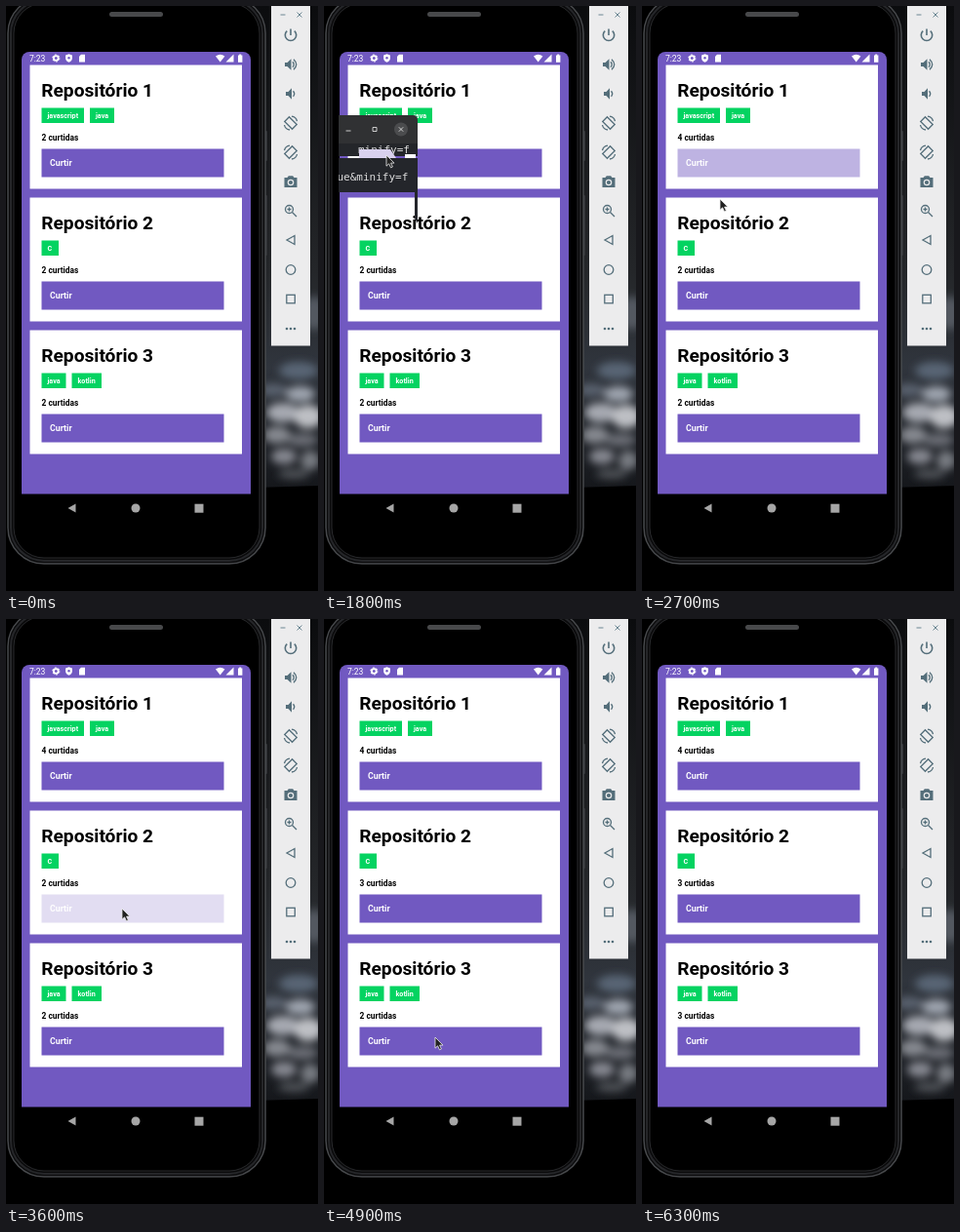
An HTML page for the animation above (6400 ms loop, 320 by 600 pixels).

```html
<!DOCTYPE html>
<html lang="pt">
<head>
<meta charset="utf-8">
<style>
  html, body { margin: 0; width: 100%; height: 100%; overflow: hidden; background: #000; }
  svg { display: block; font-family: Roboto, sans-serif; }
  .bold { font-weight: 700; }
  .mono { font: 11px "DejaVu Sans Mono", monospace; fill: #ddd; }
  .line { fill: none; stroke: #546e7a; stroke-width: 1.3; }
</style>
</head>
<body>
<svg id="stage" width="320" height="600" viewBox="0 0 320 600">
  <defs>
    <filter id="soft" x="-50%" y="-50%" width="200%" height="200%"><feGaussianBlur stdDeviation="4"/></filter>
    <linearGradient id="sky" x2="0" y2="1">
      <stop stop-color="#0b0c0e"/><stop offset=".55" stop-color="#242629"/>
      <stop offset=".75" stop-color="#30353d"/><stop offset="1" stop-color="#15171b"/>
    </linearGradient>
    <clipPath id="photo"><path d="M255 0H320V492L255 494Z"/></clipPath>
  </defs>

  <rect width="320" height="600"/>
  <g clip-path="url(#photo)">
    <rect x="255" width="65" height="494" fill="url(#sky)"/>
    <g id="clouds" filter="url(#soft)"></g>
  </g>

  <!-- phone -->
  <rect x="265" y="128" width="3" height="31" rx="1" fill="#333438"/>
  <rect x="265" y="194" width="3" height="62" rx="1" fill="#333438"/>
  <rect x="2" y="-9" width="264" height="581" rx="37" fill="#0a0a0b" stroke="#47494c" stroke-width="1.5"/>
  <rect x="5" y="-6" width="258" height="575" rx="34" fill="none" stroke="#252629" stroke-width="2"/>
  <rect x="8" y="-3" width="252" height="569" rx="31" stroke="#3a3b3e" stroke-width=".7"/>
  <rect x="106" y="6" width="55" height="5" rx="2.5" fill="#48494b"/>
  <path d="M16 500.500V55a8 8 0 0 1 8-8H243a8 8 0 0 1 8 8V500.500Z" fill="#7159c1"/>

  <!-- status bar -->
  <g fill="#fff">
    <text x="24" y="56.600" font-size="8.500">7:23</text>
    <circle cx="51.300" cy="53.500" r="2.400" fill="none" stroke="#fff" stroke-width="1.800"/>
    <circle cx="51.300" cy="53.500" r="3.600" fill="none" stroke="#fff" stroke-width="1" stroke-dasharray="1.900 1.870"/>
    <path d="M64.500 49.200l3.400 1.400v2.600q0 3-3.400 4.600q-3.400-1.600-3.400-4.600v-2.600Z"/>
    <circle cx="64.500" cy="53.200" r="1.200" fill="#7159c1"/>
    <path d="M77 49.700h4v7.800h-6v-5.800Z"/>
    <path d="M215 51.500q4.700-3.500 9.400 0l-4.700 6Z"/>
    <path d="M233.500 49.500v8h-8Z"/>
    <path d="M238 50.500h1.200v-1h2v1h1.200v7.200h-4.400Z"/>
  </g>

  <g id="cards"></g>

  <g fill="#a6a6a6">
    <path d="M71.500 510.500v9l-8-4.500Z"/>
    <circle cx="133" cy="515" r="4.500"/>
    <rect x="193.500" y="510.700" width="9" height="9"/>
  </g>

  <!-- emulator toolbar -->
  <rect x="272" width="40" height="348.500" fill="#ececed"/>
  <g class="line">
    <path d="M281.500 9h5M298.500 6.500l5 5m0-5l-5 5" stroke="#6c8793" stroke-width="1"/>
    <path d="M292 23.500v6.500M288.200 25.600a5.700 5.700 0 1 0 7.600 0" stroke-width="1.600"/>
    <path d="M294 57.200q2.500 2.800 0 5.600M295 54.700q5.500 5.300 0 10.600M294.500 87.200q2.500 2.800 0 5.600"/>
    <g id="rotate">
      <rect x="288.700" y="114.500" width="6.600" height="11" transform="rotate(-45 292 120)"/>
      <path d="M293 113.200q4.500.5 5.500 5M285.500 122q.8 4.300 5.500 5"/>
    </g>
    <use href="#rotate" transform="matrix(-1 0 0 1 584 30)"/>
    <circle cx="290.500" cy="208.500" r="4"/>
    <path d="M293.500 211.500l4.500 4.500M288.500 208.500h4m-2-2v4"/>
    <path d="M296 235.500v9l-8-4.500Z"/>
    <circle cx="292" cy="270.500" r="4.800"/>
    <rect x="287.800" y="296.300" width="8.500" height="8.500"/>
  </g>
  <g fill="#546e7a">
    <path d="M286 58h2.500l4-3.800v11.600l-4-3.800H286ZM287 88h2.500l3.500-3.800v11.600l-3.500-3.800H287Z"/>
    <path d="M285.500 176h3l1.300-1.800h4.400l1.300 1.800h3v10h-13Z"/>
    <circle cx="292" cy="181" r="2.700" fill="none" stroke="#ececed" stroke-width="1.200"/>
    <circle cx="288" cy="331" r="1.300"/><circle cx="292" cy="331" r="1.300"/><circle cx="296" cy="331" r="1.300"/>
  </g>

  <!-- terminal window -->
  <svg id="terminal" x="15" y="112" width="82" height="112">
    <path d="M0 0H76q5 0 5 5V29H0Z" fill="#303133"/>
    <circle cx="64" cy="14.500" r="7" fill="#4b4c4e"/>
    <path d="M7.500 16h5M35 12.500h4v4h-4ZM61.800 12.300l4.400 4.400m0-4.400l-4.400 4.400" fill="none" stroke="#ddd" stroke-width=".9"/>
    <rect y="29" width="81" height="13" fill="#24262a"/>
    <text class="mono" x="20" y="39">minify=f</text>
    <path d="M21 35H53l6 9H21Z" fill="#d9d1ee"/>
    <path d="M68 40H79v4H68Z" fill="#fff"/>
    <path d="M0 44H81V111L78 106V79H0Z" fill="#24262b"/>
    <text class="mono" x="-1.500" y="67">ue&amp;minify=f</text>
  </svg>

  <path id="cursor" d="M0 0V11.200L2.600 8.800L4.500 12.800L6.400 12L4.600 8.100H8Z" fill="#222" stroke="#eee" stroke-width=".8"/>
</svg>

<script>
const LOOP = 6400;
const PRESS_MS = 150, RELEASE_MS = 250, DIM = 0.2;
const $ = id => document.getElementById(id);

// cx, cy, rx, ry, colour
const clouds = [
  [316, 315, 14, 17, '#535860'], [300, 374, 20, 9, '#596575'], [274, 394, 14, 7, '#59606d'],
  [302, 398, 15, 8, '#9ea4af'], [284, 417, 17, 10, '#a6a9b1'], [310, 421, 15, 12, '#bdbfc4'],
  [278, 440, 14, 9, '#85888f'], [304, 445, 16, 7, '#696c73'], [285, 462, 13, 8, '#858790'],
  [312, 466, 10, 10, '#777a81'], [295, 480, 16, 5, '#4f5259']
];
$('clouds').innerHTML = clouds.map(([x, y, rx, ry, fill]) =>
  `<ellipse cx="${x}" cy="${y}" rx="${rx}" ry="${ry}" fill="${fill}"/>`).join('');

// tags: name, x, width; taps: [press, release, counted]
const repos = [
  { tags: [['javascript', 36.5, 43.5], ['java', 86, 25]], taps: [[2050, 2200, 2300], [2450, 2600, 2700]] },
  { tags: [['C', 36.5, 17.5]], taps: [[3450, 3600, 3700]] },
  { tags: [['java', 36.5, 25], ['kotlin', 67.5, 30.5]], taps: [[5050, 5210, 5300]] }
];

const tag = ([name, x, width]) => `
  <rect x="${x}" y="104.500" width="${width}" height="15.500" fill="#04d361"/>
  <text class="bold" x="${x + 6}" y="114.800" font-size="7.200" fill="#fff">${name}</text>`;

$('cards').innerHTML = repos.map((repo, i) => `
  <g transform="translate(0 ${i * 136})">
    <rect x="24.500" y="60.500" width="217.500" height="127" fill="#fff"/>
    <text class="bold" x="36.300" y="93" font-size="19.150">Repositório ${i + 1}</text>
    ${repo.tags.map(tag).join('')}
    <text class="bold" id="count${i}" x="36.500" y="137.600" font-size="8.400"></text>
    <g id="button${i}">
      <rect x="36.500" y="146.500" width="187" height="29" fill="#7159c1"/>
      <text class="bold" x="45" y="164.200" font-size="8.800" fill="#fff">Curtir</text>
    </g>
  </g>`).join('');

// time, x, y of the pointer
const path = [
  [1500, 79, 127], [1800, 64, 153], [2050, 100, 158], [2550, 100, 158], [2700, 80, 198],
  [3000, 95, 240], [3350, 119, 297], [3650, 119, 297], [4050, 114, 429], [4900, 114, 429],
  [5100, 105, 430], [5700, 105, 430], [6000, 300, 390]
];

const clamp = v => Math.max(0, Math.min(1, v));
const ease = v => v < 0.5 ? 2 * v * v : 1 - 2 * (1 - v) ** 2;

function opacityAt(taps, t) {
  return taps.reduce((opacity, [press, release]) => {
    const down = ease(clamp((t - press) / PRESS_MS));
    const up = ease(clamp((t - release) / RELEASE_MS));
    return Math.min(opacity, 1 - (1 - DIM) * down * (1 - up));
  }, 1);
}

function pointerAt(t) {
  const next = path.findIndex(point => point[0] > t);
  if (next < 1) return null;
  const [t0, x0, y0] = path[next - 1], [t1, x1, y1] = path[next];
  const k = ease((t - t0) / (t1 - t0));
  return [x0 + (x1 - x0) * k, y0 + (y1 - y0) * k];
}

function show(id, visible) {
  $(id).setAttribute('visibility', visible ? 'visible' : 'hidden');
}

function draw(now) {
  const t = Math.floor(now % LOOP / 100) * 100;
  repos.forEach(({ taps }, i) => {
    const likes = 2 + taps.filter(tap => t >= tap[2]).length;
    $('count' + i).textContent = likes + ' curtidas';
    $('button' + i).setAttribute('opacity', opacityAt(taps, t));
  });
  show('terminal', t >= 1600 && t < 1900);
  const pointer = pointerAt(t);
  show('cursor', pointer);
  if (pointer) $('cursor').setAttribute('transform', `translate(${pointer})`);
  requestAnimationFrame(() => draw(performance.now() - start));
}

const start = performance.now();
draw(0);
</script>
</body>
</html>
```
